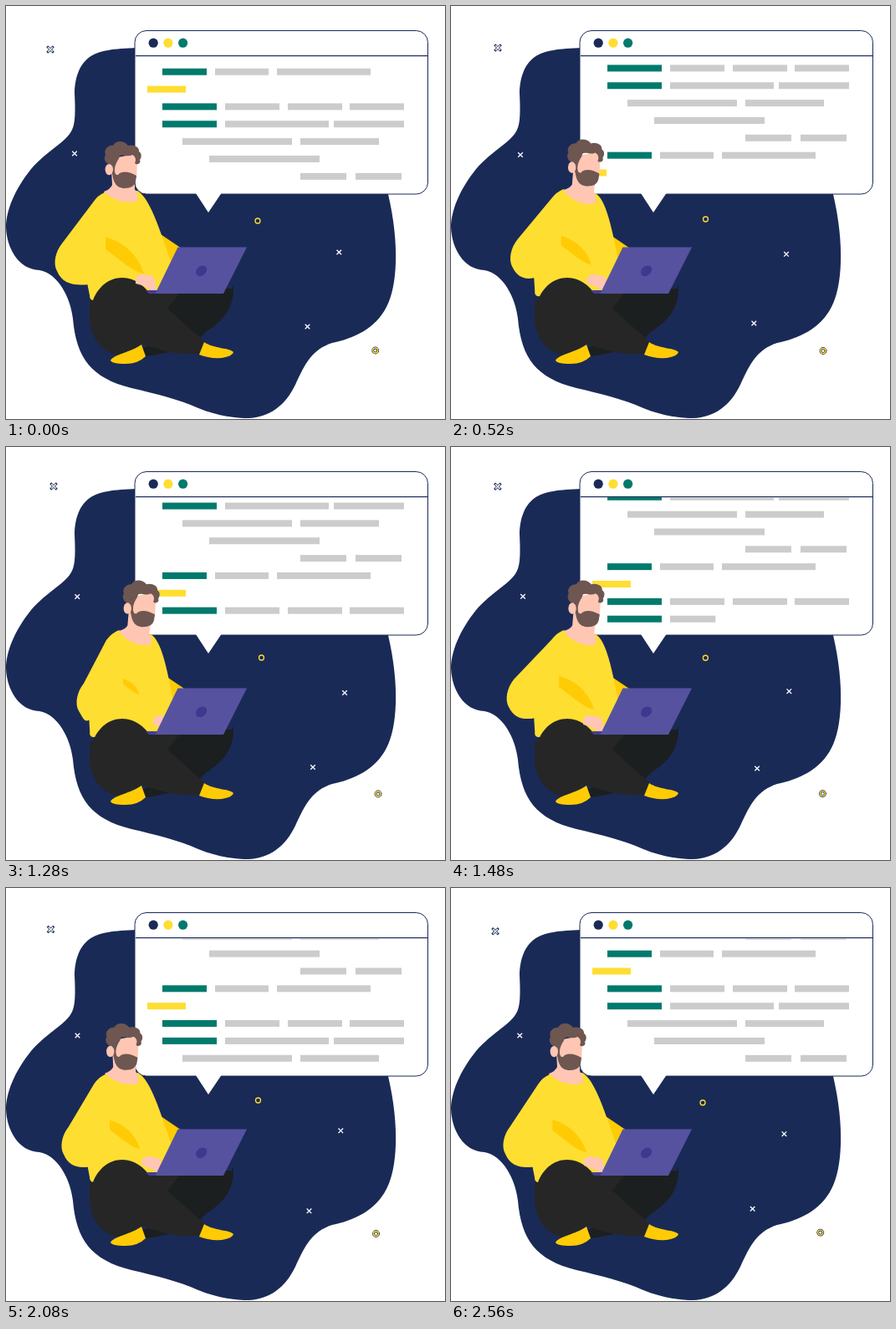
An HTML page with a canvas that plays this animation: 525x494 px, repeating every 2600 ms.

```html
<!DOCTYPE html>
<html lang="en">
<head>
<meta charset="utf-8">
<title>Coding</title>
<style>
  html, body { margin: 0; width: 100%; height: 100%; overflow: hidden; background: #fff; }
  canvas { display: block; }
</style>
</head>
<body>
<canvas id="stage" width="525" height="494"></canvas>
<script>
const ctx = document.getElementById('stage').getContext('2d');
const LOOP = 2600, STEP = 40;
const NAVY = '#1a2a57', YELLOW = '#ffde32', AMBER = '#ffcb05', GREEN = '#007a6c',
  GREY = '#cccccc', SKIN = '#ffc6b3', HAIR = '#6e5651';

const clamp = (v, lo, hi) => Math.min(hi, Math.max(lo, v));
const ease = u => { u = clamp(u, 0, 1); return u * u * (3 - 2 * u); };

// Linear interpolation through [time, value] keys
function track(keys, t) {
  const i = Math.max(1, keys.findIndex(k => k[0] >= t));
  const [t0, a] = keys[i - 1], [t1, b] = keys[i];
  return a + (b - a) * (t - t0) / (t1 - t0);
}

function fill(color, path) {
  ctx.fillStyle = color;
  ctx.fill(typeof path === 'string' ? new Path2D(path) : path);
}

function disc(color, x, y, rx, ry = rx, turn = 0) {
  const p = new Path2D();
  p.ellipse(x, y, rx, ry, turn, 0, 7);
  fill(color, p);
}

function moved(transform, draw) {
  ctx.save();
  transform();
  draw();
  ctx.restore();
}

// Code lines: colour of the first bar, then [left, right] of each bar
const ROW = 20.85;
const lines = [
  [GREEN, [187, 240], [250, 314], [324, 436]],
  [YELLOW, [169, 215]],
  [GREEN, [187, 252], [262, 327], [337, 402], [411, 476]],
  [GREEN, [187, 252], [262, 386], [392, 476]],
  [GREY, [211, 342], [352, 446]],
  [GREY, [243, 375]],
  [GREY, [352, 407], [418, 473]]
];
const scroll = [[0, 0], [100, 19], [380, 26], [520, 46], [680, 62], [920, 65.3], [1280, 70.7],
  [1420, 81], [1720, 83.4], [1800, 101], [2080, 104.3], [2160, 122], [2320, 125], [2400, 143],
  [2560, ROW * 7], [LOOP, ROW * 7]];
const typing = [[0, 0], [30, 0], [430, 229], [485, 229], [520, 246], [580, 275], [715, 275],
  [920, 403], [1130, 535], [1290, 535], [1720, 805], [1725, 808], [1760, 808], [2070, 1033],
  [2130, 1033], [2310, 1165], [2370, 1165], [2540, 1275], [LOOP, 1275]];

function drawLine([first, ...bars], y, ink) {
  bars.forEach(([x0, x1], i) => {
    ctx.fillStyle = i ? GREY : first;
    ctx.fillRect(x0, y - 4, clamp(ink, 0, x1 - x0), 8);
    ink -= x1 - x0;
  });
}

function drawWindow(t) {
  ctx.lineWidth = 1;
  ctx.strokeStyle = NAVY;
  ctx.beginPath();
  ctx.roundRect(154, 29.5, 350.5, 195.5, 14);
  ctx.fillStyle = '#fff';
  ctx.fill();
  ctx.stroke();
  fill('#fff', 'M227 224H257.500L242 247Z');
  ctx.fillStyle = NAVY;
  ctx.fillRect(155, 59, 349, 1.2);
  [NAVY, YELLOW, GREEN].forEach((c, i) => disc(c, 176.2 + i * 17.7, 44.2, 5.6));

  const shift = track(scroll, t);
  let ink = track(typing, t);
  moved(() => { ctx.beginPath(); ctx.rect(155, 60, 349, 164); ctx.clip(); }, () => {
    lines.forEach((line, i) => {
      const y = 78.7 + i * ROW - shift;
      drawLine(line, y, Infinity);
      drawLine(line, y + ROW * lines.length, ink);
      ink -= line.slice(1).reduce((sum, [a, b]) => sum + b - a, 0);
    });
  });
}

// Drifting ornaments: x and y at the shared key times
const driftTimes = [0, 520, 920, 1280, 1720, 2080, LOOP];
const ornaments = [
  { x: [53, 56, 58, 57, 54.5, 53.5], y: [52, 50, 48.5, 47, 47.5, 49.5] },
  { x: [82, 83, 84, 85.2, 87, 85.5], y: [176.5, 178, 178.7, 179, 178.5, 176.5] },
  { x: [398.3, 401, 403.5, 405, 403.5, 400.3], y: [294.5, 296.8, 297, 294, 290, 290.3] },
  { x: [360.5, 362.3, 366, 367, 365, 362.5], y: [383.5, 379.5, 379.5, 383, 386.3, 386.3] },
  { x: [301, 304.5, 306.5, 305.5, 303, 301.5], y: [257, 255, 253.5, 252, 252.5, 254], ring: true },
  { x: [441.7, 445, 446.7, 445, 443.7, 442.5], y: [412, 412.5, 415, 415, 414, 413.5], ring: true }
];
const drift = (values, t) => track(driftTimes.map((k, i) => [k, values[i % 6]]), t);

function drawOrnament({ x, y, ring }, t) {
  const cx = drift(x, t), cy = drift(y, t), r = 2.8;
  ctx.beginPath();
  if (ring) ctx.arc(cx, cy, 3, 0, 7);
  else for (const s of [-1, 1]) {
    ctx.moveTo(cx - r, cy - r * s);
    ctx.lineTo(cx + r, cy + r * s);
  }
  ctx.lineCap = 'square';
  ctx.strokeStyle = NAVY;
  ctx.lineWidth = 2.8;
  ctx.stroke();
  ctx.lineCap = 'butt';
  ctx.strokeStyle = ring ? YELLOW : '#fff';
  ctx.lineWidth = 1.3;
  ctx.stroke();
}

function drawHead() {
  fill(SKIN, 'M128 182L155 177Q160 180 157 188L156 206H128Z');
  fill(HAIR, 'M124 190C117 187 117 181 119 178C116 171 124 166 128 167C131 160 142 161 146 167' +
    'C151 165 160 168 159 174C163 176 162 182 160 184C162 188 157 191 154 188C156 184 155 180 151 178' +
    'C146 181 140 177 136 179C135 185 129 188 130 200L127 202L127 190Z');
  fill(HAIR, 'M127 195H129.500Q130 203 134 202C139 196 149 199 156 203L155 210Q153 218 142 218C131 218 127 209 127 195Z');
  disc(SKIN, 123.3, 195.6, 4.7, 6.7);
}

function drawArm(lean, reach) {
  const ex = 58 + 5 * lean + 22 * reach, ey = 303 - 7 * lean + 6 * reach;
  const low = 334 - 9 * lean + 3 * reach;
  fill(YELLOW, `M${118 + 17 * lean} ${223 - 4 * lean}
    Q${110 + 17 * lean} ${226 - 4 * lean} ${104 + 16 * lean} ${235 - 4 * lean}
    L${ex + 9} ${ey - 19} C${ex + 1} ${ey - 9} ${ex - 2} ${ey + 5} ${ex + 3} ${ey + 14}
    C${ex + 9} ${low - 2} ${(ex + 104) / 2} ${low + 1} 99 ${low - 1} L150 325 L150 250Z`);

  const size = 1 - 0.6 * reach;
  moved(() => {
    ctx.translate(119 + 8.5 * lean + 13 * reach, 276.5 - 3 * lean + 4 * reach);
    ctx.scale(size, size);
  }, () => fill(AMBER, 'M0 0C24 6 40 24 46 44C30 40 18 27 0 14.500Z'));
}

function drawMan(t) {
  const lean = ease(t / 580) - ease((t - 1430) / 770);
  const reach = 0.5 - 0.5 * Math.cos(18 * Math.PI * t / LOOP);

  fill('#1c1f1f', 'M200 338H270L271.500 333C274 356 264 374 240 389L231 398L190 362Z');
  moved(() => ctx.translate(9 * lean, 3 * lean),
    () => fill(AMBER, 'M182 271L210 290L196 310L180 300Z'));
  moved(() => {
    ctx.translate(140, 345);
    ctx.rotate(lean * 8 * Math.PI / 180);
    ctx.translate(-140, -345);
  }, () => {
    fill(YELLOW, 'M118 222L157 221C172 229 184 268 198 308L180 342L105 352Q100 352 100 346L97 331L108 240Z');
    fill(SKIN, 'M126 196L127 214Q125 219 117 222C127 232 144 238 157 233Q159 227 154 219V205Z');
  });
  moved(() => ctx.translate(22 * lean, -2.7 * lean), drawHead);
  drawArm(lean, reach);

  fill('#1c1f1f', 'M160 410L168 419Q185 417 205 411L190 400Z');
  fill('#262626', 'M100 352H104C110 336 123 325 139 325C155 325 165 335 172 344H207L193 362' +
    'L238 402L231 416C215 417 200 416 188 412L163 405L134 418C113 413 99 395 100 368Z');
  fill(SKIN, `M${155 + 22 * reach} 327q1 -7 9 -6l13 3l3 16h-7q-8 -6 -18 -8z`);

  fill(AMBER, 'M162 405L167 419Q158 428 143 428Q127 428 125 424C128 417 150 414 162 405Z');
  fill(AMBER, 'M237 402L231 417Q243 422 258 421Q271 419 272 414C269 409 248 410 237 402Z');
  fill('#443e96', 'M167 340H182L180 344H171Z');
  fill('#5652a0', 'M205.500 288.500H288L260 344H178.500Z');
  disc('#40388f', 233.6, 316.8, 7.3, 5.6, -0.7);
}

function draw(now) {
  const t = Math.floor(now % LOOP / STEP) * STEP;
  ctx.fillStyle = '#fff';
  ctx.fillRect(0, 0, 525, 494);
  fill(NAVY, 'M157 50C128 51 112 53 100 61C86 71 82 90 82 105C83 125 83 140 79 148' +
    'C72 163 50 172 30 195C10 220 0 245 0 265C1 290 15 315 40 316C62 320 77 348 80 374' +
    'C84 421 102 445 150 457C180 464 205 470 230 481C255 491 275 493 290 493' +
    'C315 492 334 478 346 453C358 427 366 411 390 403C415 398 442 386 455 360' +
    'C468 336 471 285 457 225L300 100Z');
  ornaments.forEach(o => drawOrnament(o, t));
  drawWindow(t);
  drawMan(t);
  requestAnimationFrame(draw);
}
requestAnimationFrame(draw);
</script>
</body>
</html>
```
